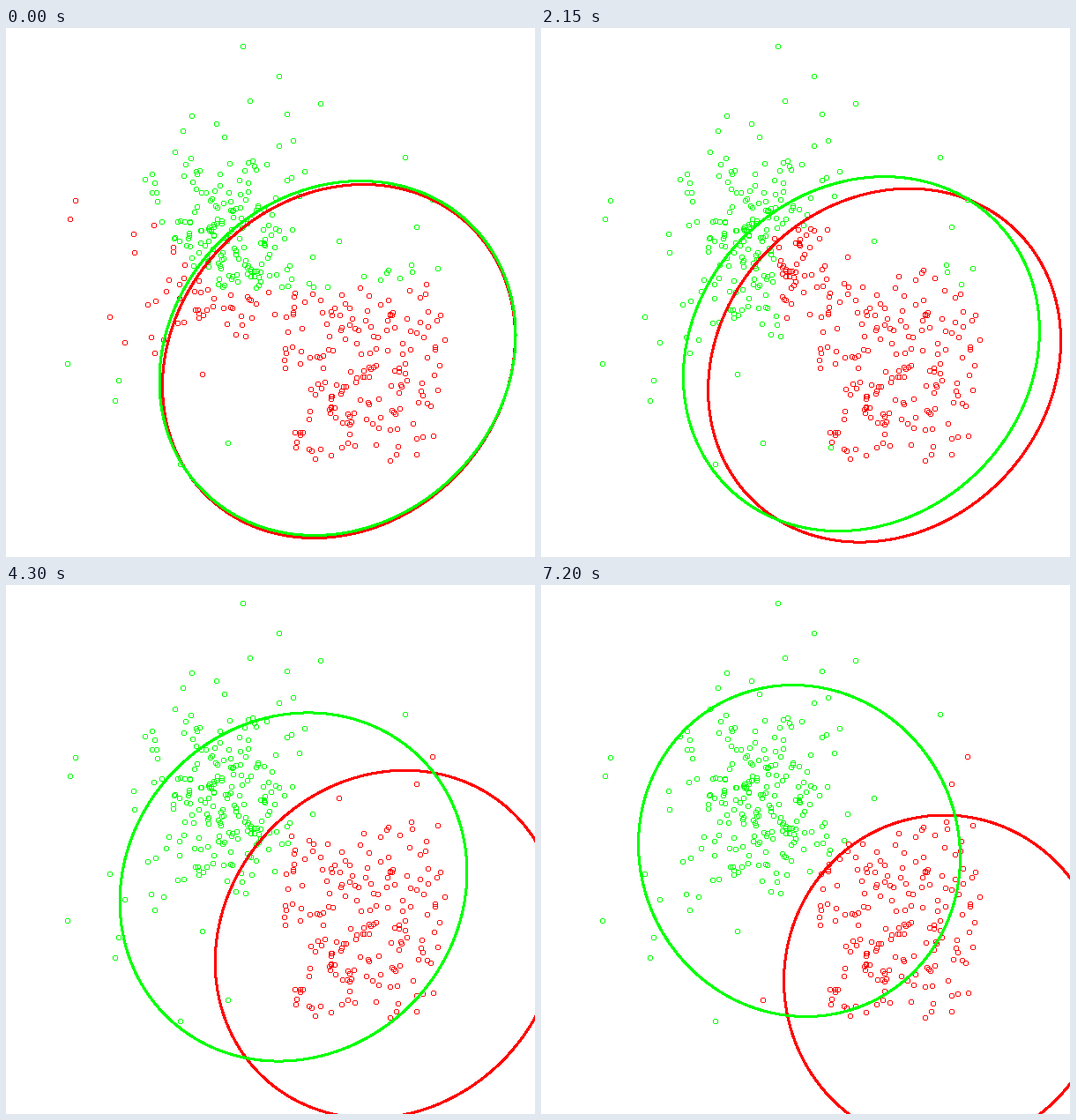
These frames come from a looping animation (600 by 600 pixels, 7250 ms). A matplotlib script:

```python
import numpy as np
import matplotlib.pyplot as plt
from matplotlib.animation import FuncAnimation
from matplotlib.path import Path

SIZE, DPI = 600, 100
FRAMES, STEP = 145, 50
PX = 72 / DPI
RED, GREEN = (1.0, 0, 0, 1), (0, 1.0, 0, 1)

# Progress of the fit over time: slow start, quick convergence
TIMES = [0, 1450, 2750, 3500, 4300, 4500, 4700, 4900, 5250]
STAGES = [0, 1, 2, 3, 4, 4.45, 4.8, 4.95, 5]

# Paths of the ellipse centres, one key per stage
RED_PATH = [(377, 377.5), (381, 380), (396, 384),
            (409, 389.5), (432, 407), (457, 448.5)]
GREEN_PATH = [(375.5, 374), (371, 371), (356, 367.5),
              (347, 362), (325.5, 342), (292.5, 301)]

# Half width, half height and correlation at the start and the end
RED_SHAPE = (200, 200.5, -.14), (182, 188, 0)
GREEN_SHAPE = (202, 201, -.13), (182.5, 188, .04)

# Edge of the red class, from the right side round to the bottom
EDGE_STAGES = [0, 1, 2, 4, 5]
EDGES = [[(620, 280), (235, 300), (60, 100), (40, 310), (280, 490)],
         [(620, 330), (320, 258), (263, 275), (264, 355), (350, 560)],
         [(620, 390), (340, 185), (262, 188), (285, 310), (370, 560)],
         [(620, 110), (385, 232), (322, 280), (310, 350), (315, 560)],
         [(620, 50), (395, 235), (318, 318), (270, 390), (205, 560)]]

STRAYS = [(268, 20), (309, 54), (356, 85), (452, 146), (483, 194), (465, 225),
          (78, 195), (72, 216), (69, 380), (123, 422), (197, 494), (251, 470)]

rng = np.random.default_rng(12)


def cloud(n, center, spread, low, high):
    """Normal cluster cut to a box and kept left of the square cluster."""
    p = rng.normal(center, spread, (n * 5, 2))
    keep = ((p > low) & (p < high)).all(axis=1) & (p.sum(axis=1) < 630)
    return p[keep][:n]


core = cloud(165, (245, 235), (48, 55), (160, 150), (360, 370))
halo = cloud(62, (225, 240), (68, 95), (98, 60), (400, 435))
block = (314, 265) + rng.beta(1.4, 1.4, (190, 2)) * (185, 228)
points = np.round(np.vstack([STRAYS, core, halo, block]))


def ring_marker():
    """One-pixel ring on a six by six grid, built from unit squares."""
    grid = np.arange(-3, 3)
    cells = [(x, y) for x in grid for y in grid
             if 2.3 < np.hypot(x + .5, y + .5) < 3.1]
    square = np.array([(0, 0), (1, 0), (1, 1), (0, 1), (0, 0)])
    codes = [Path.MOVETO] + [Path.LINETO] * 3 + [Path.CLOSEPOLY]
    return Path(np.vstack([square + c for c in cells]), codes * len(cells))


def blend(keys, stages, s):
    """Linear interpolation between arrays of equal shape."""
    keys = np.asarray(keys, float)
    i = min(np.searchsorted(stages, s, side="right") - 1, len(stages) - 2)
    u = (s - stages[i]) / (stages[i + 1] - stages[i])
    return keys[i] * (1 - u) + keys[i + 1] * u


ANGLE = np.linspace(0, 2 * np.pi, 361)


def ellipse(path, shape, s):
    cx, cy = blend(path, range(len(path)), s)
    a, b, rho = blend(shape, (0, 1), (s / 5) ** 6)
    x, y = np.cos(ANGLE), np.sin(ANGLE)
    return cx + a * x, cy + b * (rho * x + np.sqrt(1 - rho * rho) * y)


def point_colors(s):
    edge = np.vstack([blend(EDGES, EDGE_STAGES, s), (620, 620)])
    red = Path(edge).contains_points(points)
    return np.where(red[:, None], RED, GREEN)


fig = plt.figure(figsize=(SIZE / DPI, SIZE / DPI), dpi=DPI, facecolor="white")
ax = fig.add_axes([0, 0, 1, 1])
ax.set(xlim=(-.5, SIZE - .5), ylim=(SIZE - .5, -.5))
ax.axis("off")

dots = ax.scatter(*points.T, s=(6 * PX) ** 2, marker=ring_marker(),
                  c=point_colors(0), linewidths=0, antialiased=False, zorder=1)
style = dict(lw=2 * PX, antialiased=False, zorder=2)
red_line, = ax.plot([], [], color=RED, **style)
green_line, = ax.plot([], [], color=GREEN, **style)


def draw(frame):
    s = np.interp(frame * STEP, TIMES, STAGES)
    dots.set_facecolors(point_colors(s))
    red_line.set_data(*ellipse(RED_PATH, RED_SHAPE, s))
    green_line.set_data(*ellipse(GREEN_PATH, GREEN_SHAPE, s))
    return dots, red_line, green_line


anim = FuncAnimation(fig, draw, frames=FRAMES, interval=STEP,
                     repeat=True, repeat_delay=0, blit=False)
plt.show()
```
